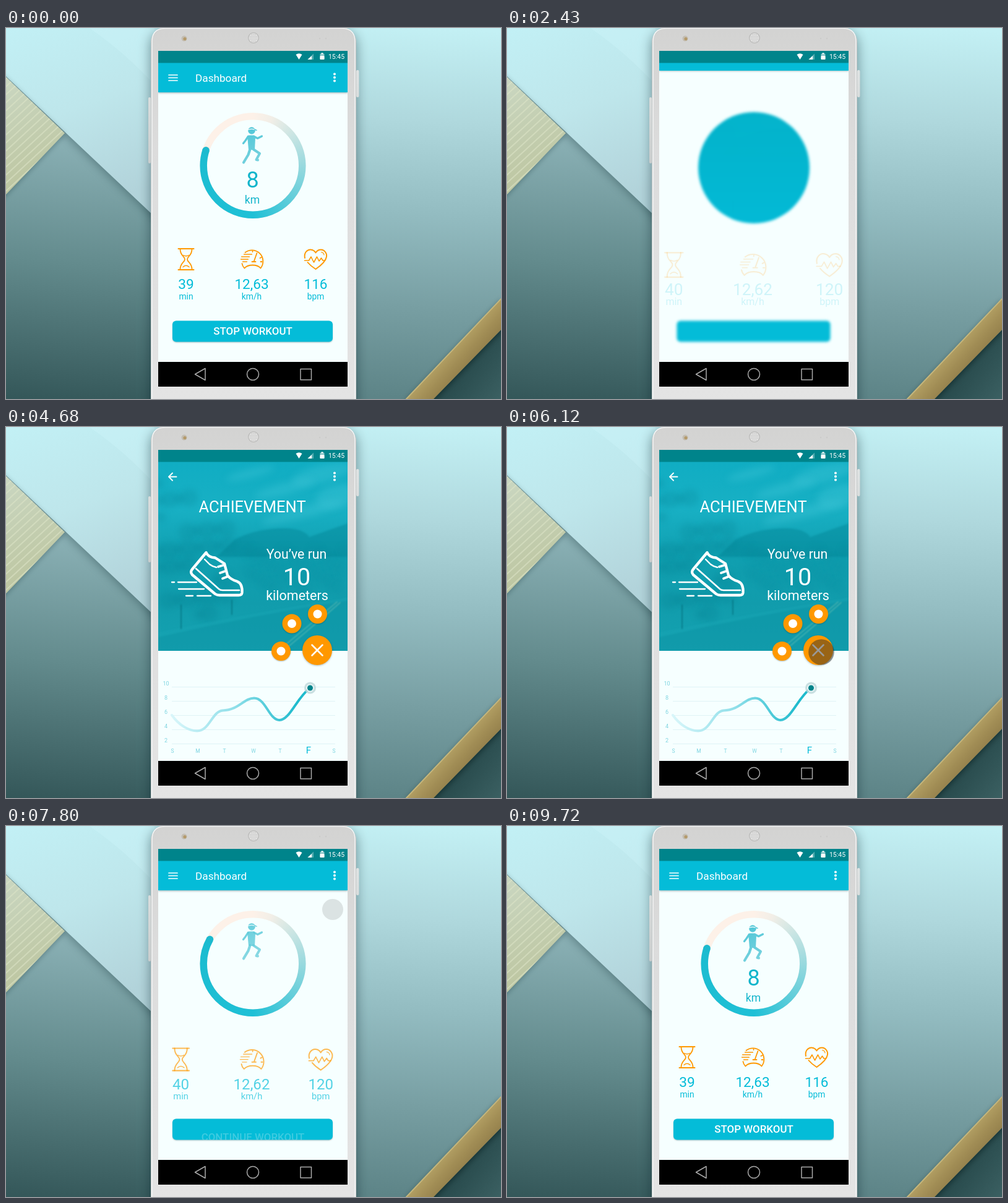
An HTML page with a canvas that plays this animation: 800x600 px, repeating every 9.9 s.

```html
<!DOCTYPE html>
<html lang="en">
<head>
<meta charset="utf-8">
<title>Workout dashboard</title>
<style>
html, body { margin: 0; width: 100%; height: 100%; overflow: hidden; }
canvas { display: block; width: 800px; height: 600px; }
</style>
</head>
<body>
<canvas id="stage" width="800" height="600"></canvas>
<script>
const LOOP = 9900;
const CYAN = '#04bcd8', ORANGE = '#ff9800', PAPER = '#f6ffff', FONT = 'Roboto, sans-serif';
let c = document.getElementById('stage').getContext('2d');

// ---- helpers
const clamp = x => Math.max(0, Math.min(1, x));
const mix = (a, b, k) => a + (b - a) * k;
const smooth = x => x * x * (3 - 2 * x);
const ramp = (t, a, b) => smooth(clamp((t - a) / (b - a)));
const show = (t, a, b, d, e) => ramp(t, a, b) * (1 - ramp(t, d, e));
const easeBack = x => 1 + 2.2 * (x - 1) ** 3 + 1.2 * (x - 1) ** 2;

function layer(alpha, draw) {
  if (alpha <= 0.003) return;
  c.save();
  c.globalAlpha *= Math.min(1, alpha);
  draw();
  c.restore();
}
function gradient(x0, y0, x1, y1, ...colors) {
  const g = c.createLinearGradient(x0, y0, x1, y1);
  colors.forEach((col, i) => g.addColorStop(i / (colors.length - 1), col));
  return g;
}
function fill(d, style) { c.fillStyle = style; c.fill(new Path2D(d)); }
function stroke(d, style, width) {
  c.strokeStyle = style;
  c.lineWidth = width;
  c.lineCap = c.lineJoin = 'round';
  c.stroke(new Path2D(d));
}
function rect(x, y, w, h, style, r = 0) {
  c.fillStyle = style;
  c.beginPath();
  c.roundRect(x, y, w, h, r);
  c.fill();
}
function disc(x, y, r, style) {
  c.fillStyle = style;
  c.beginPath();
  c.arc(x, y, Math.max(0, r), 0, 7);
  c.fill();
}
function text(s, x, y, size, style, align = 'center', weight = 400) {
  c.font = `${weight} ${size}px ${FONT}`;
  c.textAlign = align;
  c.fillStyle = style;
  c.fillText(s, x, y);
}
function clipRect(x, y, w, h) {
  c.beginPath();
  c.rect(x, y, w, h);
  c.clip();
}
function shadow(color, blur, y = 0) {
  c.shadowColor = color;
  c.shadowBlur = blur;
  c.shadowOffsetY = y;
}
function prerender(draw) {
  const canvas = document.createElement('canvas');
  canvas.width = 800;
  canvas.height = 600;
  const main = c;
  c = canvas.getContext('2d');
  draw();
  c = main;
  return canvas;
}

// ---- still parts
const backdrop = prerender(() => {
  rect(400, 0, 400, 600, gradient(690, 0, 660, 600, '#c3f0f4', '#afd8dd', '#93bcc1', '#789fa3', '#5d8487'));
  rect(0, 0, 400, 600, gradient(60, 150, 20, 600, '#8fb5ba', '#638b8d', '#345759'));
  c.save();
  shadow('rgba(0,30,35,.35)', 16, 3);
  fill('M-30 -30H400V456L-30 50Z', gradient(0, 0, 110, 300, '#c2f0f5', '#bee6eb', '#b2d3da'));
  c.restore();
  fill('M135 0Q195 42 240 92V0Z', 'rgba(215,250,252,.22)');
  const sheet = 'M-20 60L95 170L-20 290Z';
  c.save();
  shadow('rgba(0,30,35,.3)', 9, 2);
  fill(sheet, gradient(0, 90, 60, 230, '#c9d6c0', '#bec7a3'));
  c.restore();
  c.save();
  c.clip(new Path2D(sheet));
  for (let i = 0; i < 16; i++) stroke(`M-20 ${100 + i * 13}L110 ${-20 + i * 13}`, 'rgba(222,230,200,.55)', 2);
  c.restore();
  fill('M689 602L802 486V602Z', gradient(730, 545, 800, 600, '#26484a', '#3b6062'));
  c.save();
  shadow('rgba(0,20,20,.5)', 10, 3);
  fill('M645 602L802 436V486L689 602Z', gradient(690, 550, 722, 580, '#b3a064', '#a18d55', '#917d4a'));
  c.restore();
  stroke('M645 602L802 436', '#c5b67c', 2);

  // phone
  c.save();
  shadow('rgba(0,25,30,.45)', 20, 5);
  rect(234, -1, 332, 720, '#d8d8d8', 24);
  c.restore();
  const side = gradient(0, 68, 0, 220, '#dfe3e3', '#c9cdcd');
  rect(230, 112, 4, 107, side, 2);
  rect(566, 68, 4.5, 44, side, 2);
  rect(234, -1, 332, 720, gradient(0, 0, 0, 600, '#bfc2c2', '#cccfcf', '#d6d8d8'), 24);
  rect(236, 0, 328, 720, gradient(0, 0, 0, 600, '#d3d3d2', '#dcdcdc', '#e0e0e0', '#e4e4e4'), 23);
  stroke('M236 600V22Q236 .5 258 .5H542Q564 .5 564 22V600', '#f4f5f5', 1.5);
  disc(288, 17, 4.5, '#c3bdb2');
  disc(289, 17.5, 2.6, '#b49a6a');
  disc(400, 16, 9, '#bcbcbb');
  disc(400, 16, 7.6, '#e2e2e1');
  for (let i = -2; i <= 2; i++)
    for (let j = -2; j <= 2; j++) if (i * i + j * j < 7) disc(400 + i * 2.6, 16 + j * 2.6, .7, '#b5b5b5');
  disc(507, 17, 1.2, '#cbcbca');
  disc(517, 17, 1.2, '#cbcbca');
  rect(246, 37, 306, 543, PAPER);
});

const scenery = prerender(() => {
  rect(246, 56, 306, 306, gradient(0, 56, 0, 362, '#10adc3', '#18b0c4', '#109fb0', '#119cac', '#14a2b1'));
  c.filter = 'blur(6px)';
  for (const [x, y, w, h] of [[510, 76, 50, 14], [450, 100, 50, 9], [535, 112, 35, 18], [395, 75, 40, 7], [480, 138, 70, 9]]) {
    c.fillStyle = 'rgba(70,200,218,.35)';
    c.beginPath();
    c.ellipse(x, y, w, h, -.25, 0, 7);
    c.fill();
  }
  c.filter = 'blur(1.5px)';
  fill('M370 182Q400 166 440 164T490 178L552 156V210H340Z', 'rgba(0,128,146,.4)');
  c.filter = 'blur(4px)';
  for (let i = 0; i < 34; i++)
    disc(246 + (i * 47) % 125, 92 + (i * 61) % 190 + ((i * 47) % 125) * .35, 9 + i * 5 % 10, 'rgba(0,120,136,.17)');
  for (let i = 0; i < 24; i++) disc(385 + i * 7.2, 196 + i * 37 % 65, 13, 'rgba(0,128,144,.1)');
  c.filter = 'blur(1px)';
  fill('M246 332Q400 300 552 276V362H246Z', 'rgba(25,165,180,.4)');
  fill('M246 340Q400 304 552 281V362H246Z', 'rgba(0,130,148,.22)');
  stroke('M440 362Q500 312 535 283M448 362Q506 314 540 284', 'rgba(130,205,185,.55)', 1.6);
  stroke('M283 326V288M365 303V280', 'rgba(0,100,115,.5)', 2);
});

function menuDots() {
  for (const y of [74.5, 80, 85.5]) disc(531, y, 2, '#fff');
}

function drawSystemBars() {
  rect(246, 37, 306, 19.5, '#00848b');
  fill('M468.500 43Q473.500 39.500 478.500 43L473.500 51Z', '#fff');
  fill('M497 41.500V51H487.500Z', 'rgba(255,255,255,.35)');
  fill('M494 45V51H487.500Z', '#fff');
  rect(507.500, 41.500, 7, 9.500, 'rgba(255,255,255,.55)', 1);
  rect(507.500, 45, 7, 6, '#fff', 1);
  rect(509.500, 40.300, 3, 2, '#fff');
  text('15:45', 534, 49.800, 10.500, '#fff');
  rect(246, 540, 306, 40, '#000');
  stroke('M305.500 560L322 550.500V569.500Z', '#aaa', 1.5);
  stroke('M389.500 560a9.500 9.500 0 1 0 19 0a9.500 9.500 0 1 0 -19 0Z', '#aaa', 1.5);
  stroke('M476 551.500H493.500V569H476Z', '#aaa', 1.5);
}

// ---- dashboard
function drawRunner() {
  const tone = gradient(380, 160, 412, 218, '#4cc5d6', '#7ad3df');
  disc(397, 166, 5.800, tone);
  stroke('M391.500 164.500Q397 162.300 402.500 164.500', PAPER, 1.2);
  stroke('M402 164L405 165.500', tone, 1.5);
  fill('M390 174Q391 173.500 393 173.500H401L403 177L402 197H392Z', tone);
  stroke('M401 175.500L406.500 178.500L413.500 175', tone, 3.2);
  stroke('M391 176L387 182L383.500 186.500', tone, 3.2);
  stroke('M394.500 196L391.500 205L384 217.500', tone, 4.2);
  stroke('M399.500 196L410 203L404.500 213L407 213.500', tone, 4);
}

function drawRing(p) {
  c.lineWidth = 11.5;
  c.lineCap = 'butt';
  c.strokeStyle = '#fdf1e8';
  c.beginPath();
  c.arc(399, 222.500, 79.800, 0, 7);
  c.stroke();
  const g = c.createConicGradient(-Math.PI / 2, 399, 222.500);
  g.addColorStop(0, 'rgba(30,188,210,0)');
  g.addColorStop(.06, 'rgba(30,188,210,.05)');
  g.addColorStop(.25, 'rgba(30,188,210,.45)');
  g.addColorStop(.5, '#1fc0d6');
  g.addColorStop(1, '#19b9cc');
  c.strokeStyle = g;
  const end = (p - .25) * 2 * Math.PI;
  c.beginPath();
  c.arc(399, 222.500, 79.800, -Math.PI / 2, end);
  c.stroke();
  disc(399 + 79.800 * Math.cos(end), 222.500 + 79.800 * Math.sin(end), 5.75, '#1dbace');
}

const icons = [
  () => {
    stroke('M-12.500 -17H12.500M-12.500 17H12.500', ORANGE, 2);
    stroke('M-9.500 -17C-10 -6 -2 -5 -2 0S-10 6 -9.500 17M9.500 -17C10 -6 2 -5 2 0S10 6 9.500 17', ORANGE, 1.8);
    stroke('M-4.500 -6.500Q0 -4 4.500 -6.500M-5 12.500Q0 8 5 12.500', ORANGE, 1.4);
  },
  () => {
    stroke('M-12 -11A18 18 0 0 1 13 14.500Q9 9.500 0 9.500T-13 14.500Q-16.500 11 -17 7', ORANGE, 1.8);
    stroke('M-14 -8H-1M-18 -4H-5M-19 0H-7M-16 4H-9', ORANGE, 1.3);
    stroke('M7 -10L2 4M-1 4H5M12 -2L14 -3M13 4H15M0 -13V-12', ORANGE, 1.8);
  },
  () => {
    stroke('M-17.500 -2C-19.500 -11 -13 -16 -8 -15.500Q-2.500 -15 0 -10.500Q3 -15.500 8.500 -15.500C14 -15.500 18.500 -10 17.500 -4Q16 5 0 16Q-8 11 -13 5', ORANGE, 1.9);
    stroke('M-18 2H-11L-7.500 -4L-3 5L2 -4L5.500 3L9 -2L11.500 2H15', ORANGE, 1.6);
    stroke('M9 -11.500Q13 -11 13.500 -7', ORANGE, 1.2);
  }
];

function drawStats(values, e) {
  const place = (x, y, draw) => {
    c.save();
    c.translate(397 + (x - 397) * (1 + .21 * e), y + 9.5 * e);
    c.scale(1 + .17 * e, 1 + .17 * e);
    draw();
    c.restore();
  };
  layer(1 - .88 * e, () => [291, 397.500, 500.500].forEach((x, i) => {
    place(x + (i == 1), 374, icons[i]);
    place(x - (i == 1) * .5, 414, () => text(values[i], 0, 8, 22.600, CYAN));
    place(x - (i == 1) * .5, 434, () => text(['min', 'km/h', 'bpm'][i], 0, 4.500, 13.800, CYAN));
  }));
}

function drawButton(t, v) {
  const k = ramp(v, 2300, 2750) ** 2;
  if (k >= 1) return;
  const w = 259 * (1 - k), h = 34 * (1 - .9 * k * k);
  layer(1 - k * k, () => {
    if (k > 0) c.filter = 'blur(2px)';
    else shadow('rgba(0,70,80,.35)', 2, 1);
    rect(398.500 - w / 2, 490.500 - h / 2, w, h, CYAN, 6);
  });
  c.save();
  clipRect(269, 473.500, 259, 34);
  const label = (s, a, dy) => layer(a, () => text(s, 399, 496.300 + dy, 16.900, '#fff', 'center', 500));
  const swap = ramp(t, 9250, 9600);
  if (t < 5000) {
    const out = ramp(t, 2070, 2300);
    label('STOP WORKOUT', 1 - out, 16 * out);
  } else {
    const enter = ramp(t, 7720, 7980);
    label('CONTINUE WORKOUT', enter * (1 - swap), 16 * (1 - enter) - 16 * swap);
    label('STOP WORKOUT', swap, 16 * (1 - swap));
  }
  c.restore();
}

function drawDashboard(t, v) {
  const late = t > 5000;
  const k = .4 * ramp(t, 0, 1100) + .6 * ramp(t, 1180, 2030);
  const back = clamp((t - 7500) / 500);
  const p = late ? mix(1, .8, 1 - (1 - back) ** 2) : .8 + .2 * k;
  const spread = 1.15 * (late ? 1 - ramp(t, 7480, 8000) : ramp(t, 2070, 2560));
  const bar = late ? 1 - ramp(t, 7400, 7780) : ramp(t, 2070, 2620);
  const restarted = t > 9300;

  if (v < 2430) {
    drawRing(p);
    const runner = late ? ramp(t, 7560, 7880) : 1 - ramp(t, 2070, 2260);
    layer(runner, () => {
      c.translate(0, -20 * (1 - runner));
      drawRunner();
    });
    layer(late ? ramp(t, 7900, 8160) : 1 - ramp(t, 2070, 2260), () => {
      text(Math.round(p * 10), 398.500, 257.500, 36, '#12b5cb');
      text('km', 398, 283.500, 17.600, '#12b5cb');
    });
  }
  drawStats([
    !restarted && (late || k > .6) ? '40' : '39',
    !restarted && (late || k > .3) ? '12,62' : '12,63',
    restarted ? 116 : late ? 120 : 116 + Math.floor(4 * k + 1e-6)
  ], spread);
  drawButton(t, v);

  if (bar < 1) {
    c.save();
    c.translate(0, -48 * bar);
    c.save();
    shadow('rgba(0,50,60,.4)', 3, 1);
    rect(246, 56, 306, 48, CYAN);
    c.restore();
    stroke('M263 76H277M263 80.500H277M263 85H277', '#fff', 1.7);
    text('Dashboard', 306, 86.500, 17.200, '#fff', 'left');
    menuDots();
    c.restore();
  }
}

// ---- achievement
function drawHeader(v) {
  if (v <= 2070) return;
  c.save();
  clipRect(246, 56, 306, 306);
  const r = 86 + 4 * ramp(v, 2070, 2430) + 170 * ramp(v, 2430, 2800);
  const y = 222.500 + 3.500 * ramp(v, 2070, 2430);
  layer(ramp(v, 2070, 2300), () => {
    if (v < 2800) c.filter = 'blur(2px)';
    disc(399, y, r, gradient(0, 130, 0, 320, '#04b4cc', CYAN));
  });
  c.beginPath();
  c.arc(399, y, r - 3, 0, 7);
  c.clip();
  layer(ramp(v, 2380, 2800), () => c.drawImage(scenery, 0, 0));
  c.restore();
}

function drawShoe() {
  stroke('M301 239Q297 234.500 301 230L323.500 203Q327 211 338 211.500L353 221L358 240Q363 246.500 373 249.500Q382.500 253 381.500 268Q381 272 376 272H345Q341 272 338 270Z', '#fff', 4.3);
  stroke('M307 229L344 262Q346 264 350 264H377', '#fff', 2.6);
  stroke('M321 214L329 222Q334 226 340 227', '#fff', 2.4);
  stroke('M343 226L353 223M346 236L356 232.500M350 245L359 241.500', '#fff', 3.8);
  stroke('M268 251H272M278 251H308M279 262H320M291 273H302M309 273H331', '#fff', 2.3);
}

function drawChart(t) {
  for (let i = 0; i < 5; i++) {
    rect(268, 420 + i * 23, 264, 1, '#dff3f6');
    text(10 - 2 * i, 258.500, 418 + i * 23, 9, '#7fd5e1');
  }
  [...'SMTWTFS'].forEach((day, i) =>
    text(day, [269, 310, 353, 400, 443, 489, 530][i], i == 5 ? 528 : 526.500, i == 5 ? 15 : 8.500, i == 5 ? CYAN : '#7fd5e1'));
  c.save();
  clipRect(266, 400, 227 * ramp(t, 2750, 3270), 120);
  stroke('M268 466C280 483 296 491.500 309 491.500C329 491.500 333 460 350 458.500C378 457 384 438.500 401 438.500C420 438.500 425 474 442 474C458 474 469 440 490 423',
    gradient(268, 0, 470, 0, '#d8f6fa', '#8fdfe9', '#1fbbcd'), 4);
  c.restore();
  const dot = ramp(t, 3120, 3300);
  disc(491.500, 422, 9.500 * dot, 'rgba(190,215,218,.8)');
  disc(491.500, 422, 6.500 * dot, '#e6f3f4');
  disc(491.500, 422, 4.500 * dot, '#00848b');
}

function drawFab(t) {
  const s = show(t, 2780, 3050, 7400, 7560);
  if (s <= 0) return;
  const open = delay => t < 5600
    ? easeBack(clamp((t - 4090 - delay) / 440))
    : 1 - ramp(t, 6120 + delay, 6420 + delay);
  [[503.500, 302.500], [462, 318], [444.500, 362.500]].forEach(([x, y], i) => {
    const m = t > 4090 + i * 60 ? open(i * 60) : 0;
    if (m <= 0.01) return;
    const px = mix(503, x, m), py = mix(361, y, m);
    c.save();
    shadow('rgba(0,40,50,.3)', 2, 1);
    disc(px, py, 15.500 * m, ORANGE);
    c.restore();
    disc(px, py, 7 * m, '#fff');
  });
  c.save();
  c.translate(503, 361);
  c.scale(s, s);
  c.save();
  shadow('rgba(0,40,50,.3)', 3, 1);
  disc(0, 0, 24, ORANGE);
  c.restore();
  layer(1 - ramp(t, 7060, 7240), () => {
    c.rotate(Math.PI / 4 * show(t, 4090, 4600, 6120, 6500));
    stroke('M-12 0H12M0 -12V12', '#fff', 2.6);
  });
  c.restore();
}

function drawAchievement(t) {
  const copy = show(t, 2600, 2950, 7310, 7440);
  layer(copy, () => {
    stroke('M275.500 80.500H263.500M269 74.500L263 80.500L269 86.500', '#fff', 1.9);
    menuDots();
    text('ACHIEVEMENT', 398, 137.500 - 10 * (1 - copy), 25.500, '#fff');
    c.save();
    c.translate(-30 * (1 - copy), 0);
    drawShoe();
    c.restore();
    c.translate(25 * (1 - copy), 0);
    text('You’ve run', 469.500, 213, 21.300, '#fff');
    text(Math.round(10 * ramp(t, 2650, 3290)), 470, 256, 39.500, '#fff');
    text('kilometers', 470.500, 279.500, 21.500, '#fff');
  });
  layer(show(t, 2700, 3200, 7310, 7450), () => drawChart(t));
  drawFab(t);
}

// ---- touch pointer: time, x, y, radius, opacity
const touch = [
  [3540, 537, 474, 17, 0], [3600, 537, 474, 17, .13], [3950, 508, 366, 17, .13], [4030, 508, 364, 21, .5],
  [4110, 508, 364, 17, .13], [4400, 537, 345, 16, .13], [4500, 537, 345, 16, 0],
  [5670, 536, 345, 17, 0], [5760, 536, 345, 17, .13], [6030, 508, 364, 17, .13], [6110, 508, 364, 21, .5],
  [6190, 508, 364, 17, .13], [6480, 536, 345, 16, .13], [6590, 536, 345, 16, 0],
  [7050, 528, 340, 17, 0], [7140, 528, 340, 21, .5], [7650, 528, 135, 21, .5], [7770, 528, 135, 17, .13],
  [8670, 528, 135, 17, .13], [9100, 480, 490, 17, .13], [9180, 480, 490, 21, .5], [9270, 480, 490, 17, .13],
  [9600, 537, 493, 16, .13], [9720, 537, 493, 16, 0]
];
function drawTouch(t) {
  const i = touch.findIndex(k => k[0] > t);
  if (i < 1) return;
  const a = touch[i - 1], b = touch[i], k = ramp(t, a[0], b[0]);
  const [, x, y, r, alpha] = a.map((n, j) => mix(n, b[j], k));
  layer(alpha, () => disc(x, y, r, '#2d2d2d'));
}

function frame() {
  const t = performance.now() % LOOP;
  // The return trip replays the opening of the header backwards.
  const v = t < 5000 ? t : 2800 - Math.max(0, t - 7320) * 1.825;
  c.drawImage(backdrop, 0, 0);
  c.save();
  clipRect(246, 37, 306, 543);
  drawDashboard(t, v);
  drawHeader(v);
  drawAchievement(t);
  drawSystemBars();
  drawTouch(t);
  c.restore();
  requestAnimationFrame(frame);
}
frame();
</script>
</body>
</html>
```
